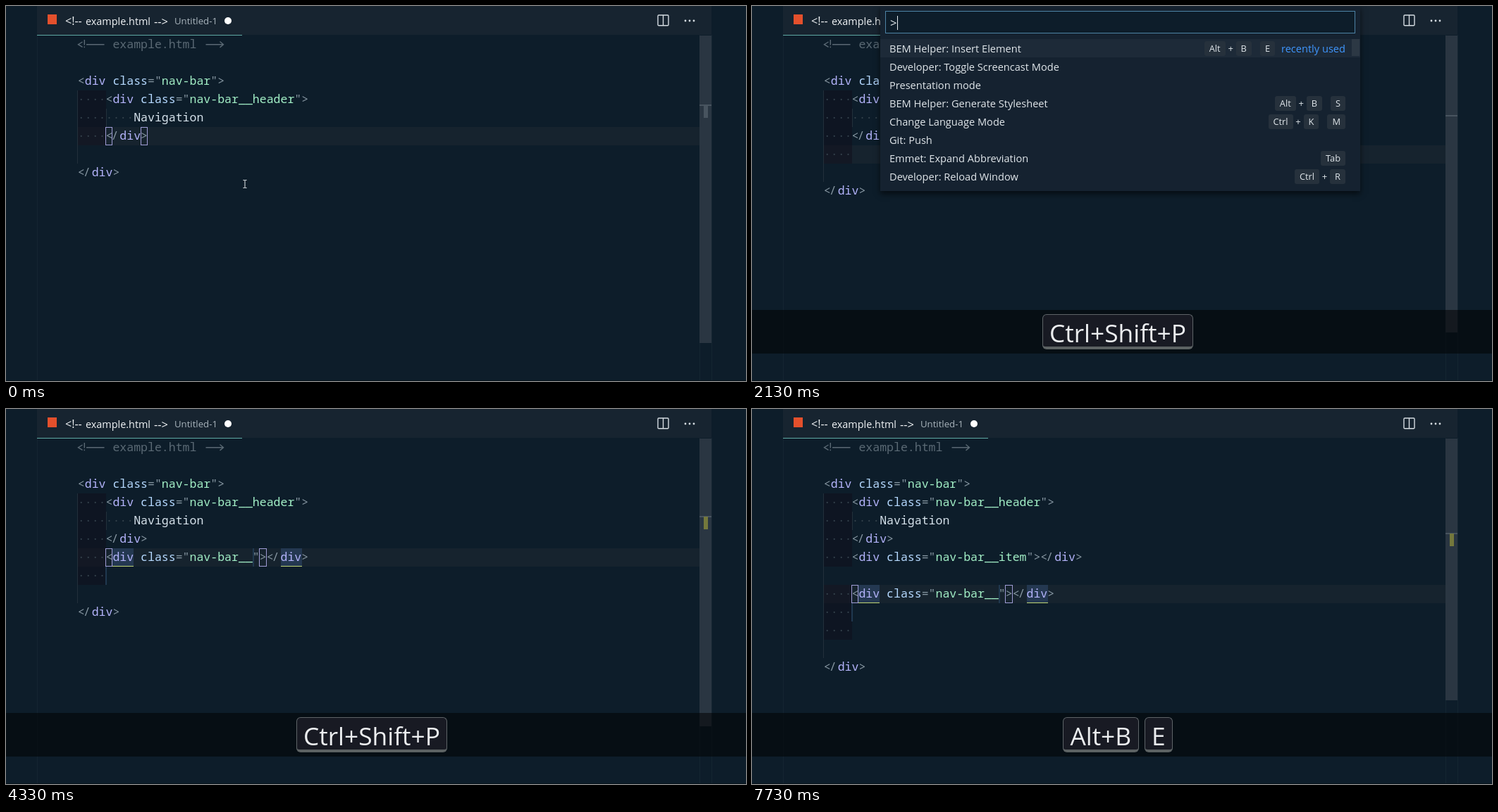
An HTML page for the animation above (8 s loop, 1050 by 533 pixels).

```html
<!DOCTYPE html>
<html lang="en">
<head>
<meta charset="utf-8">
<title>Editor snippet demo</title>
<style>
html, body { margin: 0; width: 100%; height: 100%; overflow: hidden; background: #0d1d2a; }
body { position: relative; font: 14.6px "Open Sans", "Noto Sans", sans-serif; color: #e0e6ea; }
body > *, #code > *, #bar > *, #pal > * { position: absolute; box-sizing: border-box; white-space: pre; }
b, i { font-style: normal; font-weight: inherit; }

#bar { left: 44px; top: 0; width: 957px; height: 41px; background: #172430; }
#bar span { top: 1px; line-height: 41px; color: #f2f5f7; }
#tab { left: 0; top: 41px; width: 291px; height: 1px; background: #5fa9a3; }
#logo { left: 15px; top: 12px; width: 13px; height: 14px; background: #e4502c; }
#dirty { left: 266px; top: 16px; width: 10px; height: 10px; border-radius: 5px; background: #fff; }
.edge { top: 41px; width: 1px; bottom: 0; background: #142531; }
#thumb { left: 984px; top: 42px; width: 17px; background: #2a3642; }
#mark { left: 984px; width: 17px; height: 2px; background: #48545f; }
#tee { left: 990px; width: 6px; height: 18px; }
#base { left: 0; top: 532px; width: 100%; height: 1px; background: #08131b; }

#code { left: 0; top: 0; font: 16.55px/26.08px "Noto Sans Mono", "DejaVu Sans Mono", monospace; color: #d7e3ec; }
#code .ln { left: 101.8px; height: 26.08px; margin-top: -.8px; font-variant-ligatures: none; }
.p { color: #8797a2; } .t { color: #b3b3fa; } .a { color: #b5d9ff; } .s { color: #a2efc6; }
.c { color: #5a6974; } .d { color: #35434d; }
.sl { color: #8797a2; position: relative; left: -2px; }
.cur { background: #16232e; }
.ind { background: rgba(16,15,26,.5); }
.guide { background: #22303b; }
.br { border: 1px solid #a09dd6; }
.hl { background: #243851; border-bottom: 1.5px solid #bfd473; }
.stop { background: #20384f; }
.caret { background: #a3adb5; }

#art { left: 0; top: 0; fill: none; }

#strip { left: 0; top: 432px; width: 100%; height: 62px; background: rgba(0,0,0,.53); }
#keys { left: 0; top: 438px; width: 1038px; height: 50px; display: flex; justify-content: center; gap: 8px; }
#keys b { box-sizing: border-box; height: 50px; padding: 0 9.4px; font-size: 35.3px; line-height: 51px; color: #eceef0;
  background: #181a23; border: 1px solid #5e6468; border-bottom: 4px solid #5c6263; border-radius: 6px; }

#pal { left: 182px; top: 0; width: 681px; background: #152230; box-shadow: 0 4px 8px rgba(0,0,0,.6); }
#inp { left: 7px; top: 7px; width: 667px; height: 32px; border: 1px solid #4d83a6; background: #0d1d2a;
  padding-left: 6px; line-height: 33px; color: #e8edf0; }
#inp i { font-size: 16.5px; line-height: 1; margin-right: .6px; }
#inp u { display: inline-block; width: 1px; height: 20px; background: #e8edf0; vertical-align: -4px; }
#list { left: 0; top: 47px; width: 681px; }
.row { display: flex; align-items: center; height: 26.1px; padding: 0 21px 0 13px; line-height: 27px; }
.row:first-child { background: #1d2a38; }
.row span { flex: 1; }
.row span b { font-weight: 700; }
.row + .other { margin-top: 1px; }
.row kbd { font: 12.8px/21px "Open Sans", "Noto Sans", sans-serif; height: 21px; padding: 0 7px; border-radius: 3px; background: #26313c; }
.row s { width: 15px; text-align: center; text-decoration: none; font-size: 13px; }
.row em { width: 12px; }
.row a { margin-left: 9px; color: #3f97ff; }
#scroll { left: 669px; top: 47px; width: 11px; height: 24px; background: #2c3844; }
</style>
</head>
<body>
<div class="edge" style="left:44px"></div>
<div class="edge" style="left:984px"></div>
<div class="edge" style="left:1001px"></div>
<div id="code"></div>
<div id="bar">
  <div id="logo"></div>
  <span style="left:40px;font-size:16px">&lt;!--</span>
  <span style="left:69px;font-size:14.4px">example.html</span>
  <span style="left:166px;font-size:16.5px">--&gt;</span>
  <span style="left:195px;font-size:13.2px;color:#a9b4bc">Untitled-1</span>
  <div id="dirty"></div><div id="tab"></div>
</div>
<svg id="art" width="1050" height="533">
  <g stroke="#5a6974" stroke-width="1.4">
    <path d="M108.5 51l-6 3.7 6 3.7M111.3 48v7.5M111.3 57.5v1.8M114 54.7H139.5"/>
    <path d="M283.5 54.7H308M303.5 50.5l5 4.2-5 4.2"/>
  </g>
  <g stroke="#d5dce1" stroke-width="1.4">
    <rect x="925" y="13" width="15" height="14.8" rx="1.2"/><path d="M932.5 13v14.8"/>
  </g>
  <g fill="#d5dce1"><circle cx="964" cy="21" r="1.4"/><circle cx="970" cy="21" r="1.4"/><circle cx="976" cy="21" r="1.4"/></g>
  <path id="mouse" stroke="#e6eaed" d="M-2.5-5.5h2L0-5 .5-5.5h2M0-5V5M-2.5 5.5h2L0 5l.5.5h2"/>
</svg>
<div id="thumb"></div><div id="mark"></div><div id="tee"></div><div id="base"></div>
<div id="strip"></div><div id="keys"></div>
<div id="pal"><div id="inp"></div><div id="list"></div><div id="scroll"></div></div>
<script>
const LOOP = 8000, CW = 9.93, LH = 26.08, X0 = 101.8, Y0 = 41.3;
const $ = id => document.getElementById(id);

// Code lines
const tok = (cls, s) => `<i class="${cls}">${s.replace(/</g, '&lt;')}</i>`;
const open = name => tok('p', '<') + tok('t', 'div') + ' ' + tok('a', 'class') + tok('p', '="') + tok('s', name) + tok('p', '">');
const close = tok('p', '<') + '<i class="sl">/</i>' + tok('t', 'div') + tok('p', '>');
const line = (depth = 0, html = '') => ({ depth, html });
const elem = name => line(1, open('nav-bar__' + name) + close);
const gap = line(), pad = line(1), item = elem('item');
const head = [
  line(0, tok('c', '     example.html')), gap, line(0, open('nav-bar')),
  line(1, open('nav-bar__header')), line(2, 'Navigation'), line(1, close)
];

// Each step changes part of the state at its time
const snippet = (row, before, after, name) => ({
  tail: [...before, elem(name), ...after], cur: row, caret: [25 + name.length, row],
  br: [[4, row], [26 + name.length, row]], snip: { row, n: name.length }
});
const first = name => snippet(6, [], [pad, gap], name);
const query = (t, pal) => [t, { pal }];
const steps = [
  [0, { tail: [gap], cur: 5, caret: null, br: [[4, 5], [9, 5]], snip: null, thumb: 479, mark: 140, tee: '#48545f', keys: '', pal: null }],
  [500, { caret: [10, 5] }],
  [1000, { caret: null }],
  [1200, { tail: [pad, gap], cur: 6, caret: [4, 6], br: [], thumb: 463.5, mark: 155, tee: '' }],
  [1670, { caret: null }],
  [1800, { keys: 'Ctrl' }],
  [1870, { keys: 'Ctrl+Shift' }],
  [1930, { keys: 'Ctrl+Shift+P' }],
  query(2000, ''), query(2270, 'b'), query(2330, 'be'), query(2400, 'bem'), query(2470, 'bem i'),
  query(2530, 'bem in'), query(2670, 'bem ins'), query(2930, 'bem inse'), query(3070, 'bem inser'),
  query(3130, 'bem insert'), query(3270, 'bem insert '), query(3400, 'bem insert e'),
  [3800, { pal: null, caret: [4, 6] }],
  [3870, { ...first(''), thumb: 450.5, mark: 152, tee: '#74783c' }],
  [4330, { caret: null }],
  [4470, first('i')],
  [4670, first('ite')],
  [4800, first('item')],
  [5330, { caret: null }],
  [5670, { tail: [item, pad, pad, gap], cur: 7, caret: [4, 7], snip: null, keys: 'Ctrl+Enter', thumb: 437, mark: 166, tee: '' }],
  [5730, { br: [] }],
  [5870, { tail: [item, gap, pad, pad, gap], cur: 8, caret: [4, 8], thumb: 425.5, mark: 180 }],
  [6330, { caret: null }],
  [6670, { keys: 'Alt+B' }],
  [6870, { caret: [4, 8] }],
  [7270, { keys: 'Alt+B E' }],
  [7330, { ...snippet(8, [item, gap], [pad, pad, gap], ''), thumb: 414, mark: 176, tee: '#74783c' }],
  [7730, { caret: null }]
];
let acc = {};
const states = steps.map(([t, patch]) => ({ t, ...(acc = { ...acc, ...patch }) }));

const commands = [
  ['BEM Helper: Insert Element', 'Alt+B E', 'recently used'],
  ['Developer: Toggle Screencast Mode', ''],
  ['Presentation mode', ''],
  ['BEM Helper: Generate Stylesheet', 'Alt+B S'],
  ['Change Language Mode', 'Ctrl+K M'],
  ['Git: Push', ''],
  ['Emmet: Expand Abbreviation', 'Tab'],
  ['Developer: Reload Window', 'Ctrl+R'],
  ['BEM Helper: Insert Modifier', 'Alt+B M', 'other commands']
];

const box = (cls, x, y, w, h) => `<div class="${cls}" style="left:${x}px;top:${y}px;width:${w}px;height:${h}px"></div>`;
const colX = c => X0 + c * CW, rowY = r => Y0 + r * LH;
const cells = (cls, col, row, n) => box(cls, colX(col), rowY(row), n * CW, LH);

function drawCode(s) {
  const lines = [...head, ...s.tail, line(0, close)];
  let out = box('cur', X0, rowY(s.cur), 984 - X0, LH);
  lines.forEach((l, r) => { if (l.depth) out += cells('ind', 0, r, 4); });
  out += box('guide', 101, rowY(3), 1, (lines.length - 4) * LH) + box('guide', 141.5, rowY(4), 1, LH);
  if (s.snip) {
    const { row, n } = s.snip;
    out += cells('hl', 5, row, 3) + cells('hl', 29 + n, row, 3);
    out += box('stop', colX(25), rowY(row), n * CW + 2, LH) + box('stop', 140.5, rowY(row + 1), 2, LH);
  }
  lines.forEach((l, r) => {
    out += `<div class="ln" style="top:${rowY(r)}px">${tok('d', '·'.repeat(l.depth * 4))}${l.html}</div>`;
  });
  s.br.forEach(([c, r]) => { out += box('br', colX(c) - .5, rowY(r), CW + .5, LH); });
  if (s.caret) out += box('caret', colX(s.caret[0]) - .3, rowY(s.caret[1]), 2, LH);
  $('code').innerHTML = out;
}

const shortcut = k => k.split(' ').map(c => c.split('+').map(x => `<kbd>${x}</kbd>`).join('<s>+</s>')).join('<em></em>');

function drawPalette(q) {
  $('pal').style.display = q === null ? 'none' : '';
  if (q === null) return;
  const words = q.split(' ').filter(Boolean);
  const hits = commands.filter(([name]) => words.every(w => new RegExp('\\b' + w, 'i').test(name))).slice(0, 8);
  const any = new RegExp('\\b(' + words.join('|') + ')', 'gi');
  $('inp').innerHTML = `<i>&gt;</i>${q}<u></u>`;
  $('list').innerHTML = hits.map(([name, keys, tag = '']) =>
    `<div class="row ${tag.split(' ')[0]}"><span>${q ? name.replace(any, '<b>$1</b>') : name}</span>` +
    (keys && shortcut(keys)) + (tag && `<a>${tag}</a>`) + '</div>').join('');
  $('pal').style.height = 53.8 + hits.length * 26.1 + 'px';
  $('scroll').style.display = q ? 'none' : '';
}

function draw(s) {
  drawCode(s);
  drawPalette(s.pal);
  $('thumb').style.height = s.thumb - 42 + 'px';
  $('mark').style.top = s.mark + 'px';
  $('tee').style.top = s.mark + 1 + 'px';
  $('tee').style.background = s.tee || 'none';
  $('strip').style.display = s.keys ? '' : 'none';
  $('keys').innerHTML = s.keys && s.keys.split(' ').map(k => `<b>${k}</b>`).join('');
}

// Pointer drifts up, then settles below the code
const path = [[0, 339, 253], [200, 345, 173], [730, 369, 407]];
function moveMouse(t) {
  const m = $('mouse');
  m.style.display = t < 1200 ? '' : 'none';
  const q = Math.min(730, t < 70 ? 0 : t);
  const i = q < path[1][0] ? 0 : 1, [a, b] = [path[i], path[i + 1]];
  const k = (q - a[0]) / (b[0] - a[0]), e = k * k * (3 - 2 * k);
  m.setAttribute('transform', `translate(${a[1] + (b[1] - a[1]) * e} ${a[2] + (b[2] - a[2]) * e})`);
}

let shown = null;
const start = performance.now();
function tick() {
  const t = (performance.now() - start) % LOOP;
  const s = states.filter(x => x.t <= t).pop() || states[0];
  if (s !== shown) draw(shown = s);
  moveMouse(t);
  requestAnimationFrame(tick);
}
tick();
</script>
</body>
</html>
```
